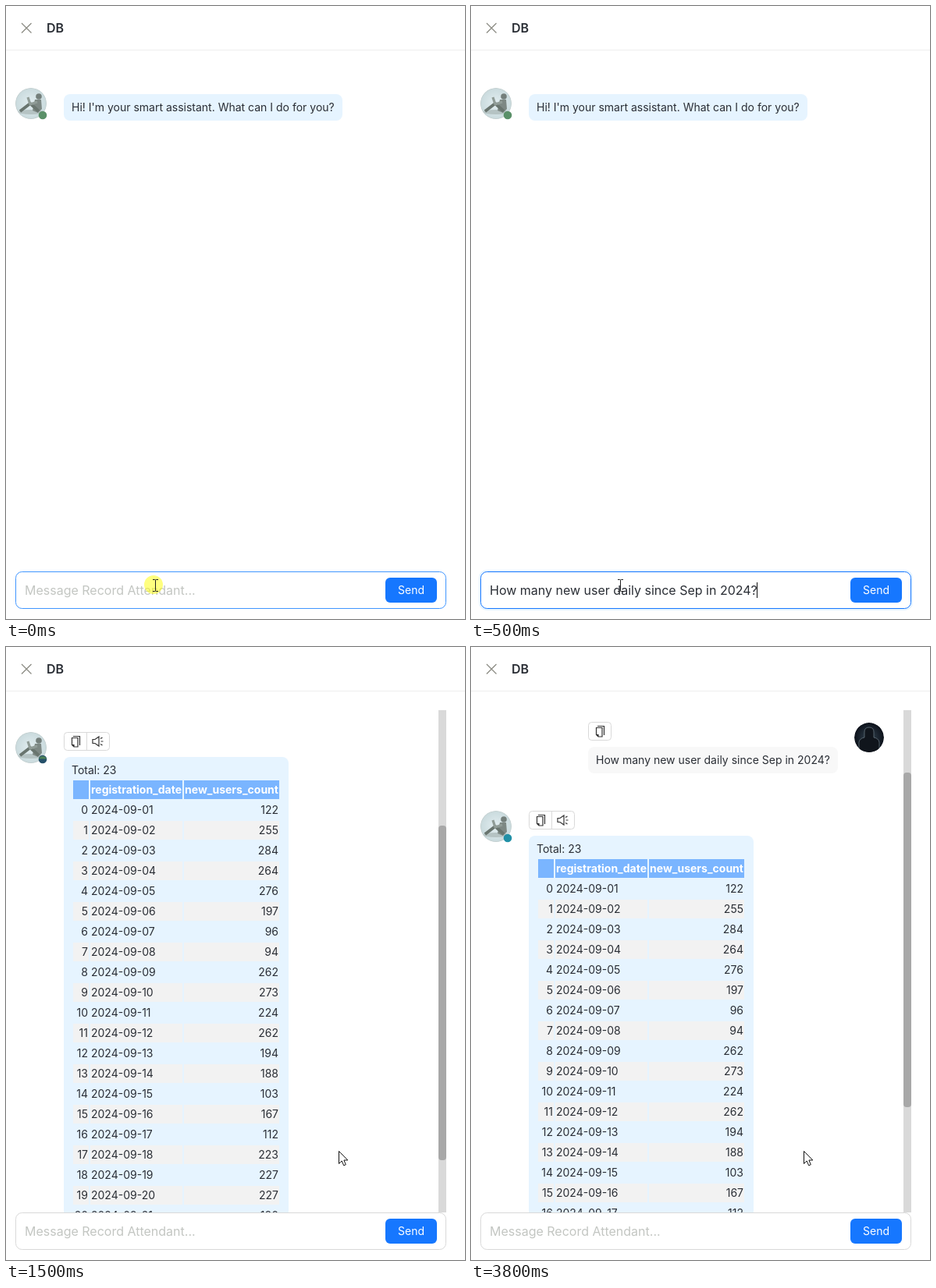
An HTML page that plays this animation: 588 px wide and 786 px high, repeating every 5000 ms.

```html
<!DOCTYPE html>
<html lang="en">
<head>
<meta charset="utf-8">
<title>Chat with a database</title>
<style>
  html, body { margin: 0; width: 100%; height: 100%; overflow: hidden; background: #fff; }
  svg { display: block; }
  text { font: 14px Inter, sans-serif; fill: #2a2e35; white-space: pre; }
  .big { font-size: 16px; }
  .title { font-size: 16px; font-weight: 600; }
  .head { font-weight: 700; fill: #fff; }
  .hint { font-size: 16px; fill: #c3c6c2; }
  .white { fill: #fff; }
  .line { fill: none; stroke: #333; stroke-width: 1.2; }
</style>
</head>
<body>
<svg id="stage" width="588" height="786" viewBox="0 0 588 786">
  <defs>
    <clipPath id="view"><rect y="81" width="588" height="644"/></clipPath>
    <clipPath id="round"><circle r="20"/></clipPath>
    <clipPath id="small"><circle r="19"/></clipPath>
    <radialGradient id="sky"><stop stop-color="#e3eef1"/><stop offset="1" stop-color="#c9dadd"/></radialGradient>
    <radialGradient id="night"><stop stop-color="#344552"/><stop offset="1" stop-color="#0c111a"/></radialGradient>
    <g id="bot" clip-path="url(#round)">
      <circle r="20" fill="url(#sky)"/>
      <ellipse cx="0" cy="11" rx="17" ry="3" fill="#b5c3c3"/>
      <circle cx="10" cy="-9" r="3.8" fill="#747f7b"/>
      <path d="M5-5L13-5L14 7L9 12L2 9Z" fill="#7d8884"/>
      <path d="M10 10L-1 0L-14 10" fill="none" stroke="#69756f" stroke-width="4" stroke-linejoin="round"/>
      <path d="M8-2L-1 1L-4-8" fill="none" stroke="#909c97" stroke-width="3.2" stroke-linejoin="round"/>
      <circle r="19.5" fill="none" stroke="#c6d1d1"/>
    </g>
    <g id="person" clip-path="url(#small)">
      <circle r="19" fill="url(#night)"/>
      <path d="M-13 20V6Q-12 1-6 0V-7Q-6-13 0-13Q6-13 6-7V0Q12 1 13 6V20Z" fill="#10151c" stroke="#6f7f88" stroke-width=".7"/>
    </g>
    <g id="copy" class="line"><path d="M-4.5-4.5H3V7H-2L-4.5 4.5ZM-2 7V4.5H-4.5M-3-6.5H5.5V5"/></g>
    <g id="sound" class="line"><path d="M-6.5-2.5H-3.5L1.5-6V6L-3.5 2.5H-6.5ZM4 0H7M3.5-3.5L6-5M3.5 3.5L6 5"/></g>
    <path id="arrow" d="M0 0V16L3.7 12.5L6.2 18.3L8.8 17.2L6.4 11.5H11.3Z" fill="#fff" stroke="#111"/>
    <path id="beam" d="M-3.5-7.5H-1Q0-7.5 0-6.5V6.5Q0 7.5-1 7.5H-3.5M3.5-7.5H1Q0-7.5 0-6.5M0 6.5Q0 7.5 1 7.5H3.5" fill="none" stroke="#222"/>
  </defs>
  <path d="M20 22L32.5 34.5M32.5 22L20 34.5" stroke="#8c8c84" stroke-width="1.3"/>
  <text class="title" x="52" y="34">DB</text>
  <path d="M0 56.5H588" stroke="#eee"/>
  <g id="chat" clip-path="url(#view)"></g>
  <g id="form"></g>
</svg>
<script>
const $ = id => document.getElementById(id);
const question = 'How many new user daily since Sep in 2024?';
const counts = [122, 255, 284, 264, 276, 197, 96, 94, 262, 273, 224, 262,
  194, 188, 103, 167, 112, 223, 227, 227, 180];

const rect = (x, y, w, h, fill, r = 0, more = '') =>
  `<rect x="${x}" y="${y}" width="${w}" height="${h}" rx="${r}" fill="${fill}" ${more}/>`;
const text = (x, y, s, cls = '', anchor = 'start') =>
  `<text x="${x}" y="${y}" class="${cls}" text-anchor="${anchor}">${s}</text>`;
const use = (id, x, y) => `<use href="#${id}" x="${x}" y="${y}"/>`;
const caret = (x, y, h) => rect(x, y, 1, h, '#111');
const bubble = (x, y, w, s, fill = '#e6f4ff') =>
  rect(x, y, w, 34, fill, 8) + text(x + 10, y + 22, s);
const bot = (y, dot) => use('bot', 32, y + 20) +
  `<circle cx="47" cy="${y + 35}" r="5.3" fill="${dot}"/>`;

function tools(x, y, both) {
  const frame = rect(x + .5, y + .5, both ? 58 : 29, 23, '#fff', 4, 'stroke="#d9d9d9"');
  const extra = `<path d="M${x + 29.5} ${y}v24" stroke="#d9d9d9"/>` + use('sound', x + 43.5, y + 12);
  return frame + use('copy', x + 15, y + 12) + (both ? extra : '');
}

const greeting = () => bot(105, '#5a9068') +
  bubble(74, 113, 357, "Hi! I'm your smart assistant. What can I do for you?");
const asked = (x, y) => tools(x, y) + bubble(x, y + 32, 320, question, '#f8f8f8') +
  use('person', x + 360, y + 20);

function answer(y, dot) {
  const cols = [[86, 20], [108, 118], [228, 122]];
  const cells = (top, fill) => cols.map(([x, w]) => rect(x, top, w, 24, fill)).join('');
  const top = y + 62;
  let out = bot(y, dot) + tools(74, y, true) + rect(74, y + 32, 288, 720, '#e6f4ff', 8) +
    text(84, y + 54, 'Total: 23') + cells(top, '#7ab5ff') +
    text(167, top + 17, 'registration_date', 'head', 'middle') +
    text(289, top + 17, 'new_users_count', 'head', 'middle');
  counts.forEach((n, i) => {
    const rowTop = top + 26 * (i + 1), base = rowTop + 17;
    if (i % 2) out += cells(rowTop, '#f2f2f2');
    out += text(105, base, i, '', 'end') +
      text(109, base, '2024-09-' + String(i + 1).padStart(2, '0')) +
      text(349, base, n, '', 'end');
  });
  return out;
}

const scrollbar = y => rect(554, 81, 10, 644, '#d9d9d9') + rect(554, y, 10, 429, '#a8a8a8', 4);

function form(border, glow, typed, sendX = 486) {
  return (glow ? rect(11, 724, 554, 50, 'none', 9, 'stroke="#0591ff" stroke-opacity=".1" stroke-width="2"') : '') +
    rect(12.5, 725.5, 551, 47, '#fff', 8, `stroke="${border}"`) +
    (typed ? text(24, 755, typed, 'big') : text(24, 755, 'Message Record Attendant...', 'hint')) +
    rect(sendX, 733, 552 - sendX, 32, '#1677ff', 6) +
    text(519, 754, 'Send', 'white', 'middle');
}

const halo = '<circle cx="189" cy="742" r="12" fill="#ff0" fill-opacity=".5"/>';
const idle = () => form('#d9d9d9') + use('arrow', 426.5, 646.5);

// Each scene: start time, conversation, input area with pointer
const scenes = [
  [0, greeting(), form('#4096ff') + halo + use('beam', 191.5, 743)],
  [500, greeting(), form('#1677ff', true, question) + caret(366, 739, 20) + use('beam', 191.5, 743)],
  [1000, greeting() + asked(160, 201) + bot(315, '#307f6d') + tools(74, 315, true) +
    bubble(74, 347, 99, 'searching...') + caret(162, 355, 17),
    form('#1677ff', true, '', 478) + caret(24, 739, 20) + use('arrow', 546.5, 740.5)],
  [1500, answer(109, '#25506a') + '<path d="M42 143.5A5.3 5.3 0 0 1 52 143.5Z" fill="#4c8057"/>' +
    scrollbar(229), idle()],
  [2000, asked(150, 96) + answer(210, '#2190a6') + scrollbar(161), idle()]
];

let shown;
function draw() {
  const time = performance.now() % 5000;
  const scene = scenes.findLast(s => s[0] <= time);
  if (scene !== shown) {
    shown = scene;
    $('chat').innerHTML = scene[1];
    $('form').innerHTML = scene[2];
  }
  requestAnimationFrame(draw);
}
draw();
</script>
</body>
</html>
```
